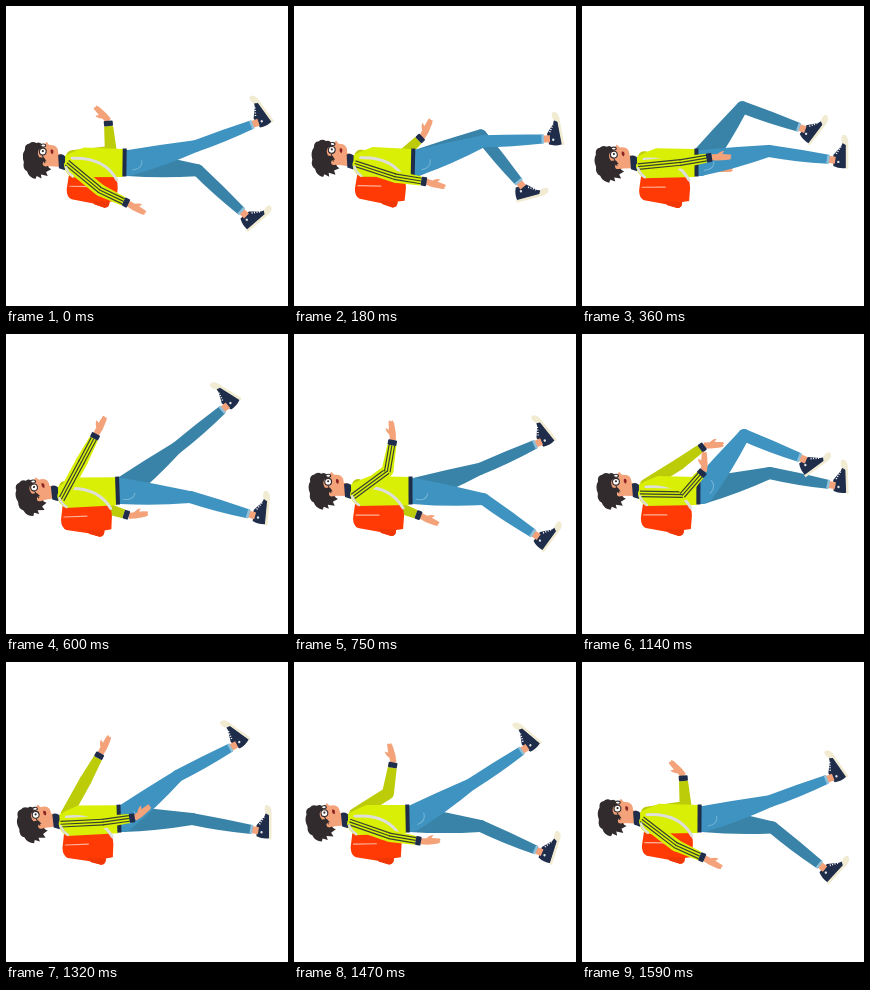
These frames come from a looping animation (282x300 px, 1.62 s). An HTML page without scripts:

```html
<!DOCTYPE html>
<html lang="en">
<head>
<meta charset="utf-8">
<title>Walk cycle</title>
<style>
html, body { margin: 0; width: 100%; height: 100%; overflow: hidden; background: #fff; }
svg { display: block; width: 100%; height: 100%; }

/* One stride is 1620 ms; the body bobs once per step. */
.hips, .torso, .head { animation: 810ms linear infinite; }
.thigh, .shin, .foot, .upper, .fore, .hand { animation: 1620ms linear infinite; }
.hips { animation-name: bob; }
.torso { animation-name: lean; }
.head { translate: 52px 156px; animation-name: nod; }

.thigh { animation-name: thigh; }
.shin { translate: 70px 0; animation-name: shin; }
.foot { translate: 64px 0; animation-name: foot; }
.far.leg g { animation-delay: -810ms; }

.upper { animation-name: near-upper; }
.fore { translate: 39px 0; animation-name: near-fore; }
.hand { translate: 32px 0; animation-name: near-hand; }
.far .upper { animation-name: far-upper; }
.far .fore { animation-name: far-fore; }
.far .hand { animation-name: far-hand; }
.near.arm { translate: 60px 160px; }
.far.arm { translate: 62px 151px; }

.near { --jeans: #3f93c0; --sleeve: #d9ef06; --stripe: #37432f; }
.far { --jeans: #3983a8; --sleeve: #bdcc08; --stripe: none; }
.jeans { fill: var(--jeans); }
.sleeve { stroke: var(--sleeve); }
.stripe { stroke: var(--stripe); fill: none; stroke-width: 1.2; }
.skin { fill: #f3a27a; }
.navy { fill: #1f2d4b; }
.lime { fill: #d9ef06; }
.hair { fill: #322b2d; }
.cream { fill: #f1ebd2; }
.line { fill: none; stroke-linecap: round; }

@keyframes bob {
  0%, 100% { translate: 122px 157px; }
  11.1% { translate: 124px 157px; }
  40.7% { translate: 120px 157px; }
  44.4% { translate: 118px 157px; }
  63% { translate: 116.5px 157px; }
  74% { translate: 115px 157px; }
  96.3% { translate: 121px 157px; }
}
@keyframes lean {
  0%, 100% { rotate: .7deg; }
  11.1% { rotate: 2deg; }
  42% { rotate: 0deg; }
  63%, 74% { rotate: -2deg; }
}
@keyframes nod {
  0%, 100% { rotate: 4deg; }
  11.1% { rotate: 10deg; }
  42% { rotate: 0deg; }
  63% { rotate: -5deg; }
  74% { rotate: -7deg; }
}
@keyframes thigh {
  0%, 100% { rotate: -14deg; }
  5.6% { rotate: -20deg; }
  20.4% { rotate: -15deg; }
  22.2% { rotate: -10deg; }
  31.5% { rotate: 0deg; }
  37% { rotate: 5deg; }
  48.1% { rotate: 7deg; }
  50% { rotate: 6deg; }
  55.6% { rotate: -5deg; }
  61.1% { rotate: -23deg; }
  70.4%, 72.2% { rotate: -53deg; }
  81.5%, 87% { rotate: -38deg; }
  98.1% { rotate: -15deg; }
}
@keyframes shin {
  0%, 100% { rotate: -7deg; }
  5.6% { rotate: 10deg; }
  20.4% { rotate: 26deg; }
  22.2% { rotate: 18deg; }
  31.5% { rotate: 10deg; }
  37% { rotate: 11deg; }
  48.1% { rotate: 31deg; }
  50% { rotate: 37deg; }
  55.6% { rotate: 58deg; }
  61.1% { rotate: 74deg; }
  70.4% { rotate: 75deg; }
  72.2% { rotate: 73deg; }
  81.5% { rotate: 10deg; }
  87% { rotate: -2deg; }
  98.1% { rotate: -6deg; }
}
@keyframes foot {
  0%, 100% { rotate: -15deg; }
  5.6% { rotate: -6deg; }
  20.4% { rotate: -13deg; }
  22.2% { rotate: -8deg; }
  31.5% { rotate: -10deg; }
  37% { rotate: -11deg; }
  48.1% { rotate: 4deg; }
  50% { rotate: 6deg; }
  55.6% { rotate: 22deg; }
  61.1% { rotate: 24deg; }
  70.4% { rotate: 32deg; }
  72.2% { rotate: 18deg; }
  81.5% { rotate: -26deg; }
  87% { rotate: -18deg; }
  98.1% { rotate: -14deg; }
}
@keyframes near-upper {
  0%, 100% { rotate: 39deg; }
  22.2% { rotate: -5deg; }
  37% { rotate: -60deg; }
  55.6% { rotate: -13deg; }
  70.4% { rotate: 1deg; }
  81.5% { rotate: -1deg; }
  98.1% { rotate: 37deg; }
}
@keyframes near-fore {
  0%, 100% { rotate: -14deg; }
  22.2% { rotate: -4deg; }
  37% { rotate: 0deg; }
  55.6% { rotate: -87deg; }
  70.4% { rotate: -50deg; }
  81.5% { rotate: -5deg; }
  98.1% { rotate: -13deg; }
}
@keyframes near-hand {
  0%, 98.1%, 100% { rotate: 4deg; }
  22.2% { rotate: 9deg; }
  37% { rotate: 0deg; }
  55.6% { rotate: -31deg; }
  70.4% { rotate: -40deg; }
  81.5% { rotate: -30deg; }
}
@keyframes far-upper {
  0%, 100% { rotate: -7deg; }
  22.2% { rotate: 12deg; }
  37% { rotate: 31deg; }
  55.6% { rotate: 30deg; }
  70.4% { rotate: -32deg; }
  81.5% { rotate: -59deg; }
  98.1% { rotate: -9deg; }
}
@keyframes far-fore {
  0%, 100% { rotate: -89deg; }
  22.2% { rotate: -7deg; }
  37% { rotate: -11deg; }
  55.6% { rotate: -8deg; }
  70.4% { rotate: -4deg; }
  81.5% { rotate: 0deg; }
  98.1% { rotate: -86deg; }
}
@keyframes far-hand {
  0%, 100% { rotate: -39deg; }
  22.2% { rotate: 0deg; }
  37% { rotate: -25deg; }
  55.6%, 70.4% { rotate: 33deg; }
  81.5% { rotate: -1deg; }
  98.1% { rotate: -38deg; }
}
</style>
</head>
<body>
<svg viewBox="0 0 282 300">
  <defs>
    <path id="thigh" class="jeans" d="M0-13Q36-10 70-6A6 6 0 0 1 70 6Q34 12 0 13A13 13 0 0 1 0-13Z"/>
    <g id="shin">
      <path class="skin" d="M56-3.500H67V3.500H56Z"/>
      <path class="jeans" d="M0-6Q30-6 60-4.500V4.500Q28 7 0 6A6 6 0 0 1 0-6Z"/>
      <path d="M58.500-4.500H61V4.500H58.500Z" fill="#8fc0da"/>
    </g>
    <g id="shoe">
      <path class="navy" d="M1-5V6Q7 9 14 8V-20Q11-20 9-14Z"/>
      <path class="cream" d="M13.500 9H16V-19Q15-26 10-25Q8-22 10-17L13.500-15Z"/>
      <path d="M4-6L9-14" stroke="#fff" stroke-width="1.600" stroke-dasharray="1 1.500"/>
      <circle cx="6" cy="2" r="1.200" fill="#dfe4ea"/>
    </g>
    <g id="upper">
      <path class="sleeve" d="M0 0H39" stroke-width="12" stroke-linecap="round"/>
      <path class="stripe" d="M-4-2.800H39M-4 0H39M-4 2.800H39"/>
    </g>
    <g id="fore">
      <path class="sleeve" d="M0-6L26-4.500V4.500L0 6Z" style="fill:var(--sleeve)" stroke-width="0"/>
      <path class="stripe" d="M-1-2.800H26M-1 0H26M-1 2.800H26"/>
      <rect class="navy" x="26" y="-4.500" width="5.500" height="9" rx="1"/>
    </g>
    <path id="hand" class="skin" d="M-1-3L5-3Q9-6.500 12-6L10-3L18-2.500Q20-1.500 18 0L19 1.500Q17 3 13 3L6 3.500L-1 3Z"/>
  </defs>

  <g class="hips">
    <g class="torso"><g transform="translate(-118 -157)">
      <g class="far arm"><g class="upper">
        <use href="#upper"/>
        <g class="fore">
          <g class="hand"><use href="#hand"/></g>
          <use href="#fore"/>
        </g>
      </g></g>
      <path d="M59 170L103 170Q108 172 108 182L107 195L100 196Q100 202 95 202L84 198L62 194Q57 192 57 184Z" fill="#ff3a04"/>
      <path d="M82 195L100 196Q100 202 95 202L85 199Z" fill="#f03705"/>
      <path class="line" d="M60 181H83" stroke="#ffb39a" stroke-width="1.200"/>
    </g></g>

    <g class="far leg"><g class="thigh">
      <use href="#thigh"/>
      <g class="shin">
        <g class="foot"><use href="#shoe"/></g>
        <use href="#shin"/>
      </g>
    </g></g>
    <g class="near leg"><g class="thigh">
      <use href="#thigh"/>
      <path class="line" d="M3 8Q13 9 14 1" stroke="#76b5d6" stroke-width="1"/>
      <g class="shin">
        <g class="foot"><use href="#shoe"/></g>
        <use href="#shin"/>
      </g>
    </g></g>

    <g class="torso"><g transform="translate(-118 -157)">
      <g class="head"><g transform="translate(-52 -156)">
        <path class="skin" d="M38 149H51V162H38Z"/>
        <path class="skin" d="M24 146Q27 140 33 141L35 138L38 141Q45 140 47 145Q49 152 45 157L38 164L26 161Z"/>
        <path class="hair" d="M31 142Q29 138 25 140Q21 138 18 141Q13 142 14 148Q11 153 14 160Q13 167 18 169Q20 175 27 176L28 173L33 175L32 171L39 172L37 168L42 165Q37 163 37 158L34 154L29 154Q26 150 28 146Q33 145 31 142Z"/>
        <ellipse class="skin" cx="36" cy="160" rx="3" ry="2.600"/>
        <path class="line" d="M32 152L35 159" stroke="#322b2d" stroke-width="1"/>
        <g fill="#fff" stroke="#322b2d" stroke-width="1.100">
          <ellipse cx="32" cy="142" rx="2.400" ry="1.500"/>
          <circle cx="32" cy="148" r="3.400"/>
        </g>
        <circle class="hair" cx="32" cy="147.500" r="1.100"/>
        <path d="M40 145Q44 145 42 150Q39 149 40 145Z" fill="#8b2323"/>
      </g></g>
      <path class="lime" d="M54 151Q63 146 74 142L113 143V171L62 172Q55 168 54 160Z"/>
      <path class="navy" d="M48 150Q52 148 55 151V165L49 163Z"/>
      <path class="navy" d="M112.500 142.500H116.500V170.500H112.500Z"/>
      <path class="line" d="M62 153Q94 151 107 174" stroke="#dedfd8" stroke-width="3"/>
      <g class="near arm"><g class="upper">
        <use href="#upper"/>
        <g class="fore">
          <g class="hand"><use href="#hand"/></g>
          <use href="#fore"/>
        </g>
      </g></g>
      <path class="line" d="M56 162Q58 168 63 171" stroke="#dedfd8" stroke-width="2.500"/>
    </g></g>
  </g>
</svg>
</body>
</html>
```
